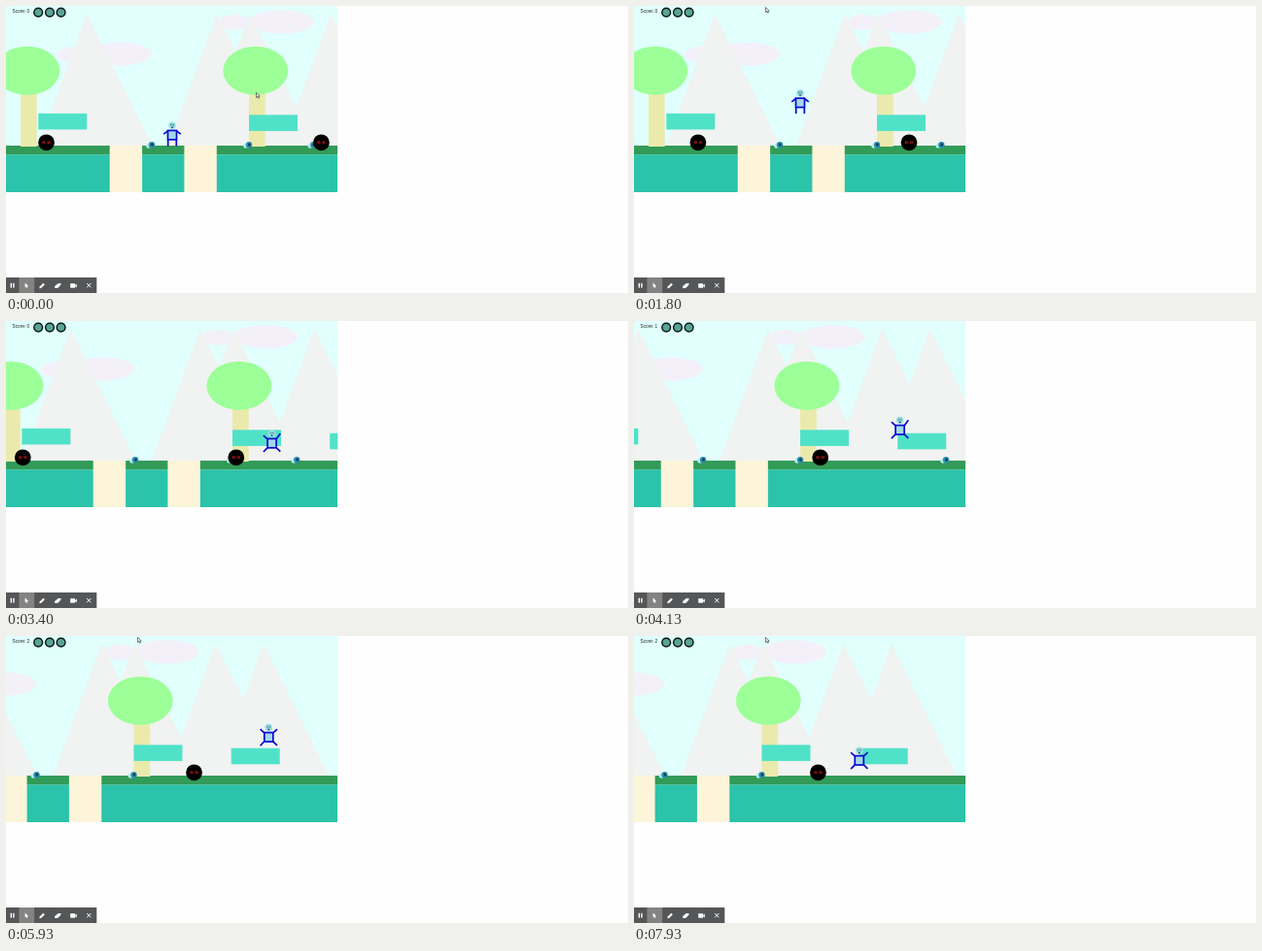
Animation of 640x296 px, one loop 8000 ms. Source, as an HTML page with a canvas:

```html
<!DOCTYPE html>
<html lang="en">
<head>
<meta charset="utf-8">
<title>Platform game</title>
<style>
  html, body { margin: 0; height: 100%; overflow: hidden; background: #fdfefd; }
  canvas { display: block; width: 640px; height: 296px; }
</style>
</head>
<body>
<canvas id="stage"></canvas>
<script>
const LOOP = 8000, STEP = 1000 / 15;
const VIEW_W = 341.3, VIEW_H = 192, FLOOR = 144;
const WALK = 0.0845, FALL = 0.0507, PATROL = 0.023;

const canvas = document.getElementById('stage');
const ratio = window.devicePixelRatio || 1;
canvas.width = 640 * ratio;
canvas.height = 296 * ratio;
const c = canvas.getContext('2d');

const clamp = (v, lo, hi) => Math.max(lo, Math.min(hi, v));

function rect(x, y, w, h, fill) {
  c.fillStyle = fill;
  c.fillRect(x, y, w, h);
}

function oval(x, y, rx, ry, fill) {
  c.fillStyle = fill;
  c.beginPath();
  c.ellipse(x, y, rx, ry, 0, 0, Math.PI * 2);
  c.fill();
}

function poly(points, fill) {
  c.fillStyle = fill;
  c.beginPath();
  points.forEach(([x, y]) => c.lineTo(x, y));
  c.closePath();
  c.fill();
}

function line(x1, y1, x2, y2) {
  c.beginPath();
  c.moveTo(x1, y1);
  c.lineTo(x2, y2);
  c.stroke();
}

// Motion
const scrollAt = t => clamp((t - 3199) * WALK, 0, 118.5);

function heroX(t) {
  const right = clamp((t - 1985) * WALK, 0, 102.6);
  const left = clamp((t - 5806) * WALK, 0, 3.3) + clamp((t - 7014) * WALK, 0, 38.5);
  return 171 + right - left;
}

// start time, height at start, height of the landing surface
const falls = [
  [1800, 33.3, 0], [2881, 33.3, 0], [3887, 33.3, 0],
  [5845, 33.3, 28.3], [7470, 28.3, 0]
];

function heroLift(t) {
  const fall = falls.filter(f => f[0] <= t + 0.01).pop();
  if (!fall) return { lift: 0, air: false };
  const [start, from, land] = fall;
  const lift = Math.max(land, from - (t - start) * FALL);
  return { lift, air: t - start > 10 && lift > land };
}

function patrol(t, lo, hi, turn) {
  const span = hi - lo;
  const d = Math.abs(t - turn) * PATROL % (2 * span);
  return lo + Math.min(d, 2 * span - d);
}

// Scenery
function cloud(x, y) {
  oval(x, y + 0.5, 16, 8, '#f4f0fa');
  oval(x + 48.5, y, 33, 12, '#f4f0fa');
}

function mountain(x) {
  poly([[x - 50, FLOOR], [x, 8], [x + 67, FLOOR]], '#f0f3f1');
}

function tree(x) {
  rect(x, 90, 16.7, 55, '#ebeaad');
  oval(x + 6.8, 66.7, 33.4, 25, '#9cff97');
}

function gem(x) {
  oval(x - 2.2, 144, 2.6, 2.6, '#b9f0f3');
  oval(x + 1, 143.3, 3.2, 3.2, '#2b8fae');
  oval(x + 1.4, 143, 1.4, 1.8, '#12405f');
}

function enemy(x) {
  oval(x, 140.8, 8.4, 8.4, '#000');
  for (const side of [-1, 1]) {
    oval(x + side * 2.6, 140.7, 1.8, 1.4, '#a01418');
    oval(x + side * 2.6, 140.7, 0.6, 0.8, '#400');
  }
}

function hero(x, lift, air, forward) {
  c.save();
  c.translate(x, FLOOR - lift);
  oval(0, -20.8, 3.8, 3.8, '#a4e2e6');
  oval(0, -21.2, 2.6, 2.4, '#86cfd6');
  oval(-1.3, -21.4, 0.6, 0.6, '#2c6b80');
  oval(1.3, -21.4, 0.6, 0.6, '#2c6b80');
  oval(0, -18.7, 0.9, 0.7, '#123');
  c.strokeStyle = '#0808cf';
  c.lineWidth = 1.7;
  rect(-4.5, -15.6, 9, 9.4, '#a2d8ee');
  c.strokeRect(-4.5, -15.6, 9, 9.4);
  if (air) {
    line(-4.5, -15.2, -8.7, -19);
    line(4.5, -15.2, 8.7, forward ? -21 : -19);
    line(-4.5, -6.4, -8.7, -2);
    line(4.5, -6.4, 8.7, -2.4);
  } else {
    line(-4.5, -15.2, -8.8, -11.8);
    line(4.5, -15.2, 8.8, -11.8);
    line(-4.3, -6.2, -4.3, 0.4);
    line(4.3, -6.2, 4.3, 0.4);
  }
  c.restore();
}

function hud(score) {
  c.fillStyle = '#222';
  c.font = '4.7px "Liberation Sans", Arial, sans-serif';
  c.fillText('Score: ' + score, 6.6, 7);
  c.strokeStyle = '#06120f';
  c.lineWidth = 1.4;
  for (const x of [33.2, 45, 56.6]) {
    oval(x, 6.6, 4.4, 4.4, '#58a497');
    c.stroke();
  }
}

function game(t) {
  const s = scrollAt(t);
  const gotFirst = t >= 3570, gotSecond = t >= 4560;
  c.save();
  c.beginPath();
  c.rect(0, 0, VIEW_W, VIEW_H);
  c.clip();
  rect(0, 0, VIEW_W, FLOOR, '#e0fffd');

  c.save();
  c.translate(-s, 0);
  cloud(68.5, 49.5);
  cloud(235.2, 16.3);
  [83.3, 217, 251, 334.3, 383.6].forEach(mountain);
  c.restore();

  rect(0, FLOOR, VIEW_W, 9.5, '#329b58');
  rect(0, 153.4, VIEW_W, 39, '#2bc3aa');

  c.save();
  c.translate(-s, 0);
  tree(15);
  tree(250);
  [106.7, 183.4].forEach(x => rect(x, FLOOR, 33.4, 48, '#fcf5d9'));
  [[33.3, 110.8], [250, 112.3], [350.2, 115.7]].forEach(([x, y]) => rect(x, y, 50, 16.6, '#50e2c9'));
  gem(149);
  gem(249);
  if (!gotFirst) gem(315.3);
  if (!gotSecond) gem(399);
  enemy(patrol(t, 33, 67.2, 370));
  enemy(patrol(t, 250, 333, 3235));
  c.restore();

  const { lift, air } = heroLift(t);
  hero(heroX(t), lift, air, t > 1985 && t < 4602);
  hud(gotFirst + gotSecond);
  c.restore();
}

// Recorder controls
function arrow(x, y, size, fill, edge) {
  c.save();
  c.translate(x, y);
  c.scale(size, size);
  poly([[0, 0], [0, 5], [1.2, 4], [2, 5.8], [2.9, 5.4], [2.1, 3.7], [3.7, 3.7]], fill);
  if (edge) {
    c.strokeStyle = edge;
    c.lineWidth = 0.6;
    c.stroke();
  }
  c.restore();
}

function toolbar() {
  const white = '#fff';
  rect(0, 280, 93.3, 16, '#555658');
  rect(13.4, 280, 15.8, 16, '#838482');
  rect(4.6, 285.8, 1.4, 4.8, white);
  rect(7.2, 285.8, 1.4, 4.8, white);
  arrow(19.6, 285.6, 0.95, white);
  poly([[34.4, 291.2], [34.6, 289.5], [38.4, 285.7], [39.9, 287.2], [36.1, 291]], white);
  poly([[50.2, 289], [53.8, 285.9], [56.6, 286], [56.2, 288], [53, 290.9], [50.2, 291]], white);
  rect(66.2, 286.2, 4.8, 4.5, white);
  poly([[71, 288], [72.8, 286.5], [72.8, 290.4], [71, 289]], white);
  c.strokeStyle = white;
  c.lineWidth = 1;
  line(83.2, 286, 87.4, 290.3);
  line(87.4, 286, 83.2, 290.3);
}

function pointer(t) {
  if (t > 2000 && t < 4400) return;
  const p = clamp((t - 250) / 550, 0, 1);
  const k = p * p * (3 - 2 * p);
  arrow(257.5 - 122 * k, 89.4 - 88 * k, 1, '#fff', '#222');
}

function draw(now) {
  const t = Math.floor((now % LOOP + 8) / STEP) * STEP % LOOP;
  c.setTransform(ratio, 0, 0, ratio, 0, 0);
  rect(0, 0, 640, 296, '#fdfefd');
  game(t);
  toolbar();
  pointer(t);
}

const begin = performance.now();
function tick() {
  draw(performance.now() - begin);
  requestAnimationFrame(tick);
}
tick();
</script>
</body>
</html>
```
